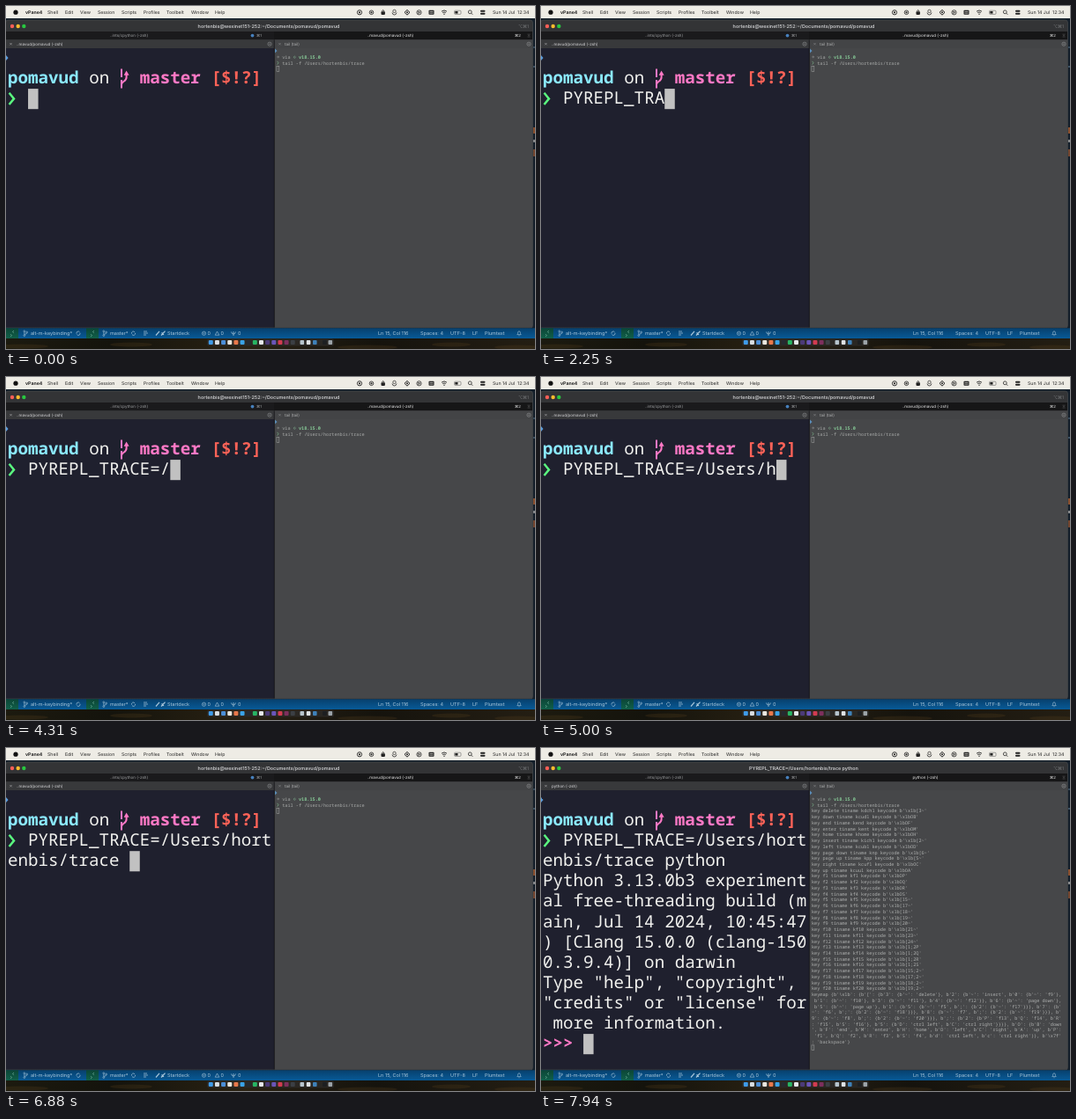
These frames come from a looping animation (600x390 px, 8000 ms). An HTML page:

```html
<!DOCTYPE html>
<html lang="en">
<head>
<meta charset="utf-8">
<title>Terminal session</title>
<style>
  html, body { margin: 0; width: 100%; height: 100%; overflow: hidden; background: #1f202e; }
  svg { display: block; width: 600px; height: 390px; }
  text { white-space: pre; text-rendering: geometricPrecision; }
  .ui { font-family: Inter, "DejaVu Sans", sans-serif; }
  .mono { font-family: "Noto Sans Mono", "DejaVu Sans Mono", monospace; }
</style>
</head>
<body>
<svg id="stage" viewBox="0 0 600 390" xmlns="http://www.w3.org/2000/svg">
  <defs>
    <linearGradient id="wall">
      <stop offset="0" stop-color="#1c1a0f"/>
      <stop offset=".2" stop-color="#14130c"/>
      <stop offset=".45" stop-color="#2a2213"/>
      <stop offset=".7" stop-color="#15130d"/>
      <stop offset="1" stop-color="#241e13"/>
    </linearGradient>
    <linearGradient id="bar" x2="0" y2="1">
      <stop offset="0" stop-color="#07406d"/>
      <stop offset="1" stop-color="#085a97"/>
    </linearGradient>
    <linearGradient id="remote" x2="0" y2="1">
      <stop offset="0" stop-color="#0c4636"/>
      <stop offset="1" stop-color="#11604a"/>
    </linearGradient>
  </defs>
</svg>
<script>
const LOOP = 8000;
const USER = 'hortenbis', PROJECT = 'pomavud';
const COMMAND = `PYREPL_TRACE=/Users/${USER}/trace python`;
const SHELL_TITLE = `${USER}@wexinet151-252:~/Documents/${PROJECT}/${PROJECT}`;
const SHELL_TAB = `..${PROJECT.slice(2)}/${PROJECT} (-zsh)`;

// Typing pace: [time in ms, characters typed]
const PACE = [[150, 0.5], [1000, 6.5], [2250, 10.5], [4310, 14.5], [5630, 27.5], [6880, 36.5], [7350, 42]];
const ENTER = 7450, OUTPUT = 7650;

// Large left pane and small right pane character grids
const BIG = { x: 2, top: 71, base: 88, w: 11.52, h: 23.1, cols: 26, size: 19.2 };
const SMALL = { x: 307, top: 55.2, base: 60, w: 3.125, h: 6.73, cols: 91, size: 5.208 };

const stage = document.getElementById('stage');

function add(tag, attrs, parent = stage) {
  const node = document.createElementNS('http://www.w3.org/2000/svg', tag);
  for (const k in attrs) node.setAttribute(k, attrs[k]);
  parent.appendChild(node);
  return node;
}
const rect = (x, y, width, height, fill, more = {}) => add('rect', { x, y, width, height, fill, ...more });
const dot = (cx, cy, r, fill, more = {}) => add('circle', { cx, cy, r, fill, ...more });
const ring = (cx, cy, r, stroke, width = .7) => dot(cx, cy, r, 'none', { stroke, 'stroke-width': width });
const line = (d, stroke, width = .7) => add('path', { d, stroke, 'stroke-width': width, fill: 'none' });

function label(x, y, str, size, fill, more = {}) {
  const node = add('text', { x, y, 'font-size': size, fill, class: 'ui', ...more });
  node.textContent = str;
  return node;
}
function cell(grid, col, row, str, fill, more = {}, parent) {
  const node = add('text', {
    x: grid.x + col * grid.w, y: grid.base + row * grid.h,
    'font-size': grid.size, fill, class: 'mono', ...more
  }, parent);
  node.textContent = str;
  return node;
}
function wrap(str, cols) {
  const rows = [];
  for (let i = 0; i < str.length; i += cols) rows.push(str.slice(i, i + cols));
  return rows;
}

function drawDesktop() {
  rect(0, 0, 600, 390, '#131e29');
  rect(0, 0, 600, 14, '#eeece5');
  rect(0, 378, 600, 12, 'url(#wall)');
  [[18, 387, 30], [142, 385, 24], [410, 388, 34], [505, 385, 22], [580, 388, 26]].forEach(([cx, cy, rx]) =>
    add('ellipse', { cx, cy, rx, ry: 2.4, fill: '#57401c', opacity: .25 }));
  [[46, 2, '#34485a'], [68, 2, '#3c5264'], [138, 7, '#8a4f2e'], [152, 3, '#85888a'], [163, 8, '#74462f']]
    .forEach(([y, h, c]) => rect(597.8, y, 2.2, h, c));
}

function drawMenu() {
  const ink = '#222';
  dot(11, 7.2, 2.6, '#111');
  label(22, 9.1, 'vPane4', 5.2, ink, { 'font-weight': 700 });
  [[47, 'Shell'], [67, 'Edit'], [84, 'View'], [104, 'Session'], [131, 'Scripts'], [156, 'Profiles'],
   [182, 'Toolbelt'], [210, 'Window'], [237, 'Help']].forEach(([x, s]) => label(x, 9.1, s, 5.2, ink));
  ring(401, 7.3, 2.6, ink, .9);
  dot(401, 7.3, 1.1, ink);
  ring(414.5, 7.3, 2.3, ink, .8);
  dot(414.5, 7.3, 1.1, ink);
  rect(425.5, 6.2, 4.4, 3.8, ink, { rx: 1 });
  line('M426.4 6.4Q427.7 2.6 429 6.4', ink, .8);
  ring(440.5, 5.9, 1.7, ink, .7);
  line('M438 7.5Q438.4 10 440.5 10Q442.6 10 443 7.5', ink, .8);
  line('M452 7.3L455 4.4L458 7.3L455 10.2Z', ink, 1);
  dot(455, 7.3, 1, ink);
  ring(468.5, 7.3, 2.6, ink, .8);
  line('M467.7 6L470 7.3L467.7 8.6Z', ink, .7);
  rect(479.5, 4.8, 6, 5, ink, { rx: .8 });
  line('M480.5 6.5H484.5M480.5 8.2H484.5', '#eeece5', .6);
  line('M494 6.2Q497 3.6 500 6.2M495.2 7.7Q497 6.2 498.8 7.7', ink, .9);
  dot(497, 9.2, .7, ink);
  rect(508.5, 5.2, 7.5, 4.2, 'none', { rx: 1, stroke: '#666', 'stroke-width': .6 });
  rect(509.3, 6, 3.2, 2.6, ink);
  ring(526.3, 6.8, 1.9, ink, .8);
  line('M527.8 8.2L529.3 9.8', ink, .8);
  rect(538, 4.8, 5.5, 2, ink, { rx: 1 });
  rect(538, 7.7, 5.5, 2, ink, { rx: 1 });
  label(552, 9.1, 'Sun 14 Jul  12:34', 5.2, ink);
}

function drawWindow() {
  rect(-.5, 16, 598, 350, '#333436', { rx: 3, stroke: '#4b4e50', 'stroke-width': .6 });
  [['#fe5f57', 7], ['#febc2e', 13.7], ['#28c840', 20.3]].forEach(([c, x]) => dot(x, 23, 2.2, c));
  label(581, 25, '⌥⌘1', 5, '#77797b');

  rect(0, 29, 304, 9.3, '#1a1a1c');
  rect(304, 29, 293, 9.3, '#161617');
  label(139.5, 35.3, '..ints/cpython (-zsh)', 4.5, '#a2a4a6', { 'text-anchor': 'middle' });
  dot(279.5, 33.6, 1.9, '#4680bd');
  label(284, 35.4, '⌘1', 4.3, '#a2a4a6');
  label(577, 35.4, '⌘2', 4.3, '#e6e6e6');
  line('M591.5 32.2H594.5M592 33.6H594M591.5 35H594.5', '#777', .4);

  rect(0, 38.3, 304, 9.7, '#38393b');
  rect(304, 38.3, 293, 9.7, '#434446');
  [[5.5, '#b8b9bb'], [310.5, '#8f9193']].forEach(([x, c]) =>
    line(`M${x - 1.2} 42l2.4 2.4M${x + 1.2} 42l-2.4 2.4`, c, .5));
  label(316, 44.9, 'tail (tail)', 4.5, '#aeb0b1');
  [299, 593].forEach(x => {
    ring(x, 43.2, 2.1, '#a3a5a7', .5);
    line(`M${x - 1} 43.2h2`, '#a3a5a7', .5);
  });

  rect(0, 48, 304, 317.5, '#1f202e');
  rect(304.6, 48, 292.6, 317.5, '#464749');
  rect(303.8, 38.3, .9, 327.2, '#17181a');
  add('path', { d: 'M0 56L2.6 59L0 62Z', fill: '#5b9fe0' });
  add('path', { d: 'M305 48.4L307.6 51L305 53.6Z', fill: '#5a8db9' });
}

function drawStatus() {
  const ink = '#a9c6da', y = 374;
  const fork = x => {
    ring(x - 1.2, 369.8, .9, ink, .6);
    ring(x - 1.2, 374.6, .9, ink, .6);
    ring(x + 1.6, 371, .9, ink, .6);
    line(`M${x - 1.2} 370.8V373.6M${x + 1.6} 372Q${x + 1.4} 373.2 ${x - 1} 373.4`, ink, .6);
  };
  const remote = x => {
    rect(x - 7, 366.3, 14, 11.7, 'url(#remote)');
    line(`M${x - 2} 373.2l1.6 1.4l-1.6 1.4M${x + 2} 369l-1.6 1.4l1.6 1.4`, '#6fae98', .7);
  };
  const sync = x =>
    line(`M${x - 2} 372.6A2 2 0 0 1 ${x + 1.5} 370.8M${x + 2} 371.8A2 2 0 0 1 ${x - 1.5} 373.6`, ink, .7);
  rect(0, 366.3, 600, 11.7, 'url(#bar)');
  remote(7);
  remote(98);
  fork(22);
  fork(112);
  sync(82);
  sync(144.5);
  line('M156 370H160M156 372H161M156 374H159', ink, .7);
  line('M170 374.5L174 369.8M176 374.5L180.5 369.6M176.5 371.5l2.5 2.2', ink, 1.2);
  ring(224.5, 372.2, 2.1, ink, .6);
  line('M223.6 371.3l1.8 1.8M225.4 371.3l-1.8 1.8', ink, .5);
  line('M237.2 374.2L239.5 370L241.8 374.2Z', ink, .6);
  line('M255.5 370.5Q256 373 258 373Q260 373 260.5 370.5M258 370V375', ink, .7);
  [[28, 'alt-m-keybinding*'], [118, 'master*'], [183, 'Startdeck'], [228.5, '0'], [243.6, '0'], [263, '0'],
   [422, 'Ln 15, Col 116'], [470, 'Spaces: 4'], [504, 'UTF-8'], [529, 'LF'], [543, 'Plumtext']]
    .forEach(([x, s]) => label(x, y, s, 5.5, ink));
  line('M579.8 373.6H584.2L583.4 372.4V371.2Q583.2 369.8 582 369.8Q580.8 369.8 580.6 371.2V372.4ZM581.5 374.8h1', ink, .6);
}

function drawDock() {
  rect(228, 378.6, 144, 8, '#2e2d2b', { rx: 2, opacity: .7 });
  ['#3f9be8', '#d8dde2', '#4b8ed8', '#e9e6de', '#e8784a', '#3aa3e6', '#252a30', '#28b463', '#e5e7ea',
   '#4c3a78', '#6a55b8', '#d23b50', '#7d2f5c', '#3b3f44'].forEach((c, i) =>
    rect(229.8 + i * 7.15, 379.9, 5, 5, c, { rx: 1.2 }));
  [['#b7c4cc', 333.5], ['#dfe2e4', 340.8], ['#3f81b8', 348], ['#1d1f21', 359], ['#9ca3a8', 365.5]]
    .forEach(([c, x]) => rect(x, 379.9, 4.6, 5, c, { rx: 1 }));
}

function drawPrompts() {
  const bold = { 'font-weight': 700 };
  const pink = '#ff79c6';
  cell(BIG, 0, 0, PROJECT, '#8be9fd', bold);
  cell(BIG, 8, 0, 'on', '#f1f1ee');
  line('M131 71.5V81M131 84V93.5M131 89.5C131 85 136.6 86.5 136.6 81V77', pink, 2);
  add('path', { d: 'M133.6 78.8L136.6 73.6L139.6 78.8Z', fill: pink });
  cell(BIG, 13, 0, 'master', pink, bold);
  cell(BIG, 20, 0, '[$!?]', '#ff6358', bold);
  line('M3.6 98.8L9 105.4L3.6 112', '#5af77f', 2.5);

  const dim = '#a9abaa';
  line('M307.2 57.9h2.2m-1-1l1.2 1l-1.2 1', dim, .5);
  cell(SMALL, 2, 0, 'via', dim);
  line('M327.3 57l.9.6v1.2l-.9.6l-.9-.6v-1.2Z', '#86b894', .5);
  cell(SMALL, 8, 0, 'v18.15.0', '#85c795', bold);
  line('M307.6 62.8l1.4 1.9l-1.4 1.9', '#85c795', .6);
  cell(SMALL, 2, 1, `tail -f /Users/${USER}/trace`, dim);
}

function keyLines() {
  const named = [
    'delete kdch1 [3~', 'down kcud1 OB', 'end kend OF', 'enter kent OM', 'home khome OH', 'insert kich1 [2~',
    'left kcub1 OD', 'page_down knp [6~', 'page_up kpp [5~', 'right kcuf1 OC', 'up kcuu1 OA'
  ];
  const codes = [15, 17, 18, 19, 20, 21, 23, 24];
  const fkeys = [
    ...[...'PQRS'].map(c => 'O' + c), ...codes.map(n => `[${n}~`),
    ...[...'PQRS'].map(c => '[1;2' + c), ...codes.slice(0, 4).map(n => `[${n};2~`)
  ].map((code, i) => `f${i + 1} kf${i + 1} ${code}`);
  return [...named, ...fkeys].map(entry => {
    const [name, cap, code] = entry.split(' ');
    return `key ${name.replace('_', ' ')} tiname ${cap} keycode b'\\x1b${code}'`;
  });
}

const KEYMAP = String.raw`keymap {b'\x1b': {b'[': {b'3': {b'~': 'delete'}, b'2': {b'~': 'insert', b'0': {b'~': 'f9'}, ` +
  `b'1': {b'~': 'f10'}, b'3': {b'~': 'f11'}, b'4': {b'~': 'f12'}}, b'6': {b'~': 'page down'}, b'5': {b'~': 'page up'}, ` +
  `b'1': {b'5': {b'~': 'f5', b';': {b'2': {b'~': 'f17'}}}, b'7': {b'~': 'f6', b';': {b'2': {b'~': 'f18'}}}, ` +
  `b'8': {b'~': 'f7', b';': {b'2': {b'~': 'f19'}}}, b'9': {b'~': 'f8', b';': {b'2': {b'~': 'f20'}}}, ` +
  `b';': {b'2': {b'P': 'f13', b'Q': 'f14', b'R': 'f15', b'S': 'f16'}, b'5': {b'D': 'ctrl left', b'C': 'ctrl right'}}}}, ` +
  `b'O': {b'B': 'down', b'F': 'end', b'M': 'enter', b'H': 'home', b'D': 'left', b'C': 'right', b'A': 'up', ` +
  `b'P': 'f1', b'Q': 'f2', b'R': 'f3', b'S': 'f4', b'd': 'ctrl left', b'c': 'ctrl right'}}, ` +
  String.raw`b'\x7f': 'backspace'}`;

const BANNER = [
  'Python 3.13.0b3 experimental free-threading build (main, Jul 14 2024, 10:45:47) [Clang 15.0.0 (clang-1500.3.9.4)] on darwin',
  'Type "help", "copyright", "credits" or "license" for more information.'
].flatMap(s => wrap(s, BIG.cols));

const TRACE = [...keyLines(), ...wrap(KEYMAP, SMALL.cols)];

drawDesktop();
drawMenu();
drawWindow();
drawStatus();
drawDock();
drawPrompts();

const title = label(298, 25, '', 5.4, '#c9cacc', { 'text-anchor': 'middle', 'font-weight': 600 });
const tab = label(436, 35.3, '', 4.5, '#f0f0f0', { 'text-anchor': 'middle' });
const pane = label(12, 44.9, '', 4.5, '#dcdcde');
const cursor = rect(0, 0, BIG.w, BIG.h, '#c1c1c1');
const typed = [cell(BIG, 2, 1, '', '#f1f1ee'), cell(BIG, 0, 2, '', '#f1f1ee')];
const smallCursor = rect(SMALL.x, 0, 2.8, 5.8, 'none', { stroke: '#a9abaa', 'stroke-width': .5 });

const output = add('g', {});
BANNER.forEach((s, i) => cell(BIG, 0, 3 + i, s, '#f1f1ee', {}, output));
cell(BIG, 0, 3 + BANNER.length, '>>>', '#ff79c6', { 'font-weight': 700 }, output);
TRACE.forEach((s, i) => cell(SMALL, 0, 2 + i, s, '#b0b2b1', {}, output));

function typedCount(t) {
  if (t < PACE[0][0]) return 0;
  for (let i = 1; i < PACE.length; i++) {
    const [t0, n0] = PACE[i - 1], [t1, n1] = PACE[i];
    if (t < t1) return Math.floor(n0 + (n1 - n0) * (t - t0) / (t1 - t0));
  }
  return COMMAND.length;
}

function render(t) {
  const running = t >= ENTER, done = t >= OUTPUT;
  const n = typedCount(t), firstRow = BIG.cols - 2;
  title.textContent = running ? COMMAND : SHELL_TITLE;
  tab.textContent = pane.textContent = running ? 'python (-zsh)' : SHELL_TAB;
  typed[0].textContent = COMMAND.slice(0, Math.min(n, firstRow));
  typed[1].textContent = COMMAND.slice(firstRow, Math.max(n, firstRow));

  let col = (n + 2) % BIG.cols, row = 1 + Math.floor((n + 2) / BIG.cols);
  if (running) [col, row] = done ? [4, 3 + BANNER.length] : [0, 3];
  cursor.setAttribute('x', BIG.x + col * BIG.w);
  cursor.setAttribute('y', BIG.top + row * BIG.h);
  smallCursor.setAttribute('y', SMALL.top + SMALL.h * (done ? 2 + TRACE.length : 2));
  output.setAttribute('visibility', done ? 'visible' : 'hidden');
}

const start = performance.now();
function tick() {
  render((performance.now() - start) % LOOP);
  requestAnimationFrame(tick);
}
tick();
</script>
</body>
</html>
```
